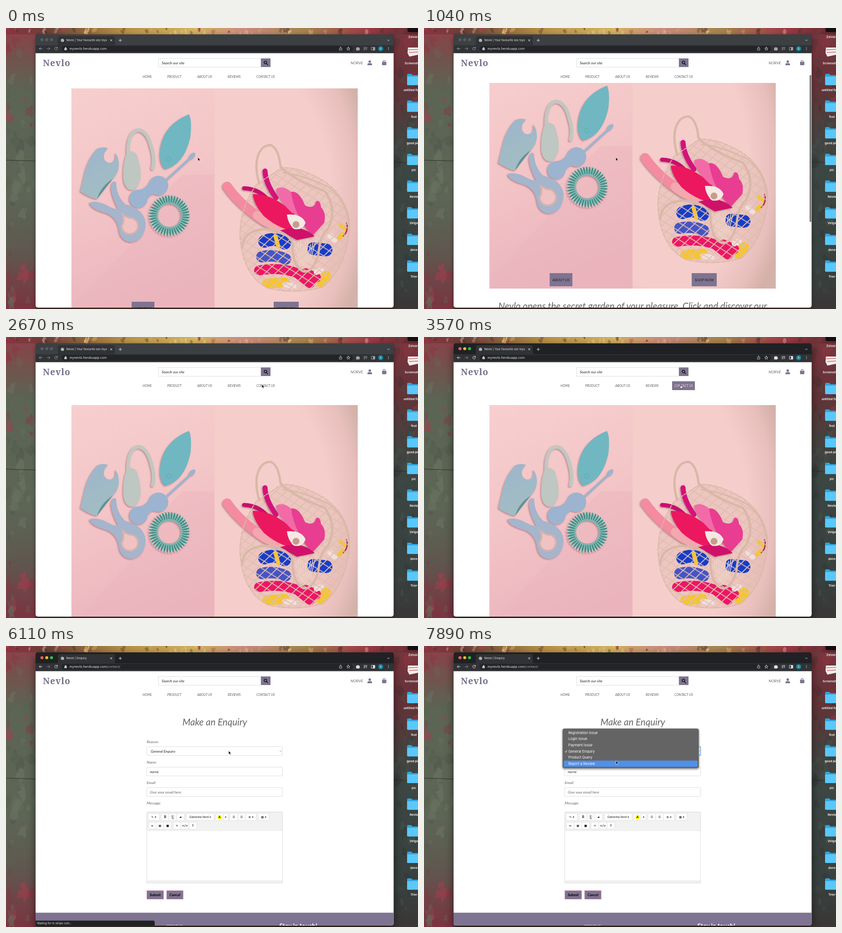
An HTML page for the animation above (8 s loop, 905 by 619 pixels).

```html
<!DOCTYPE html>
<html lang="en">
<head>
<meta charset="utf-8">
<style>
html, body { margin: 0; width: 100%; height: 100%; overflow: hidden; background: #4d5349; }
svg { display: block; width: 905px; height: 619px; }
text { font: italic 8.2px Lato, sans-serif; fill: #666; white-space: pre; }
.ui, .ui text { font: 6.2px Inter, sans-serif; fill: #e8eaed; }
.mid { text-anchor: middle; }
.nav text { font-size: 7.1px; fill: #5e5a66; }
.heading { font-size: 20.5px; }
.dark { fill: #222; }
.button text { fill: #000; font-weight: bold; }
.purple { fill: #7e7491; }
.field { fill: #fff; stroke: #ced4da; stroke-width: .8; }
.line { fill: none; stroke-linecap: round; stroke-linejoin: round; }
.label { font: bold 6.6px Inter, sans-serif; fill: #fff; filter: drop-shadow(0 .5px .6px #000); }
#options text { font: 7.7px Inter, sans-serif; fill: #fff; }
#toys, #bundle { filter: drop-shadow(-1.5px 2.5px 1.5px #a8707caa); }
</style>
</head>
<body>
<svg viewBox="0 0 905 619">
<defs>
  <linearGradient id="topWall">
    <stop offset="0" stop-color="#8b3340"/><stop offset=".1" stop-color="#6b4038"/>
    <stop offset=".28" stop-color="#b58d45"/><stop offset=".45" stop-color="#d2b25c"/>
    <stop offset=".58" stop-color="#c98a7c"/><stop offset=".72" stop-color="#a5834d"/>
    <stop offset=".88" stop-color="#9c3a45"/><stop offset="1" stop-color="#57292c"/>
  </linearGradient>
  <linearGradient id="leftWall" x2="0" y2="1">
    <stop offset="0" stop-color="#8d4049"/><stop offset=".1" stop-color="#74514c"/>
    <stop offset=".22" stop-color="#5c6454"/><stop offset=".6" stop-color="#5d6656"/>
    <stop offset=".8" stop-color="#5f574f"/><stop offset="1" stop-color="#7b3340"/>
  </linearGradient>
  <linearGradient id="rightWall" x2="0" y2="1">
    <stop offset="0" stop-color="#7d353f"/><stop offset=".2" stop-color="#633237"/>
    <stop offset=".38" stop-color="#47423f"/><stop offset=".5" stop-color="#3c4643"/>
    <stop offset=".85" stop-color="#38413f"/><stop offset="1" stop-color="#3a3636"/>
  </linearGradient>
  <linearGradient id="pinkLeft" x2=".25" y2="1">
    <stop offset="0" stop-color="#f7cfce"/><stop offset=".5" stop-color="#f3c5c7"/><stop offset="1" stop-color="#eab4bd"/>
  </linearGradient>
  <radialGradient id="pinkRight" cx=".25" cy=".45" r=".92">
    <stop offset=".6" stop-color="#f5cdca"/><stop offset=".8" stop-color="#e8bfbc"/><stop offset=".92" stop-color="#d4b1a9"/>
  </radialGradient>
  <linearGradient id="cup" x2=".4" y2="1"><stop offset="0" stop-color="#9db5cc"/><stop offset="1" stop-color="#a2bdc3"/></linearGradient>
  <pattern id="mesh" width="16" height="16" patternUnits="userSpaceOnUse" patternTransform="rotate(32) skewX(-14)">
    <path d="M0 8H16M8 0V16" stroke="#dcbfae" stroke-width="2"/>
  </pattern>
  <path id="bagShape" d="M550 345Q512 400 514 460Q520 545 575 573Q640 588 697 570Q750 525 755 435Q752 375 700 338Q645 305 605 308Z"/>
  <clipPath id="bagClip"><use href="#bagShape"/></clipPath>
  <clipPath id="windowClip"><rect x="65" y="14" width="786.5" height="602" rx="5"/></clipPath>
  <clipPath id="pageClip"><rect x="65" y="121" width="786.5" height="495"/></clipPath>
</defs>

<g id="wall">
  <rect width="905" height="619" fill="#48382f"/>
  <rect width="66" height="619" fill="url(#leftWall)"/>
  <rect x="850" width="55" height="619" fill="url(#rightWall)"/>
  <rect width="905" height="14" fill="url(#topWall)"/>
</g>
<path d="M0 291L65 293M851 295L905 297" stroke="#2c2c28" stroke-width="1"/>
<g id="desktop">
  <rect x="882" y="-18" width="30" height="27" rx="4" fill="#170d0f"/>
  <path d="M883 43H905V59L886 63L882 55Z" fill="#f3efee"/><path d="M884 48L905 47M885 54L905 53" stroke="#c66" stroke-width="1.5"/>
</g>

<rect id="shadow" x="65" y="14" width="786.5" height="602" rx="5" fill="#222"/>
<g clip-path="url(#windowClip)">
  <rect x="65" y="55" width="787" height="562" fill="#fff"/>

  <g id="home" clip-path="url(#pageClip)"><g id="scroller">
    <rect x="143.7" y="133" width="316" height="504" fill="url(#pinkLeft)"/>
    <path d="M458 323H388L360 350L300 450L150 610V637H458Z" fill="#eab3bd" opacity=".45"/>
    <rect x="458" y="133" width="314.7" height="504" fill="url(#pinkRight)"/>
    <g id="toys">
      <path d="M163 360L174 313Q182 285 200 266Q215 260 224 265Q212 276 216 289Q223 301 235 295Q243 288 239 275Q248 282 248 303Q247 324 228 338Q210 360 200 377Q183 374 163 360Z" fill="url(#cup)"/>
      <path d="M200 377Q207 350 235 332Q218 353 200 377Z" fill="#5f9497"/>
      <path class="line" d="M269 285C262 212 307 208 319 261Q328 290 322 309" stroke="#c2c7c0" stroke-width="8"/>
      <path d="M266 273Q277 268 287 278Q299 310 295 335Q287 357 276 357Q262 356 258 335Q255 300 266 273Z" fill="#bec7c1"/>
      <path d="M402 190Q340 215 338 278Q338 303 350 311Q392 300 405 240Q409 203 402 190Z" fill="#70b7c2"/>
      <circle cx="357" cy="289" r="5" fill="none" stroke="#5fa5b2"/>
      <g fill="#9cb4cf">
        <path class="line" d="M350 337L408 284" stroke="#9cb4cf" stroke-width="5"/>
        <ellipse cx="409" cy="282" rx="9" ry="5" transform="rotate(-48 409 282)"/>
        <circle cx="291" cy="376" r="20"/><circle cx="335" cy="347" r="21.5"/>
        <path d="M287 357Q308 356 317 336L343 366Q315 360 309 384Z"/>
      </g>
      <path d="M183 385Q200 378 228 394Q240 400 246 398Q233 375 230 352Q233 332 242 340Q242 369 262 388Q303 398 307 430Q305 468 275 472Q250 470 247 440Q241 413 213 406Q187 398 183 385Z" fill="#a5b5cb"/>
      <path d="M256 410Q267 419 278 419A18 18 0 1 1 254 436Q261 425 256 410Z" fill="#f0c2c4" stroke="#d2b3ae" stroke-width="4"/>
      <circle cx="359" cy="413" r="36" fill="none" stroke="#3f877f" stroke-width="15"/>
      <circle cx="359" cy="413" r="37" fill="none" stroke="#82bab4" stroke-width="17" stroke-dasharray="3.2 2.61"/>
      <circle cx="359" cy="413" r="43" fill="none" stroke="#efbfc3" stroke-width="7" stroke-dasharray="2.2 4.55"/>
      <circle cx="359" cy="413" r="27" fill="none" stroke="#86b3ae" stroke-width="4"/>
    </g>

    <use href="#bagShape" fill="#dfb3aa" opacity=".3"/>
    <g class="line" clip-path="url(#bagClip)">
      <path d="M568 470Q590 460 612 474M675 486L703 489" stroke="#173cc9" stroke-width="28"/>
      <path d="M562 504Q590 498 614 509" stroke="#4654c4" stroke-width="25"/>
      <path d="M574 563L612 560M692 560L703 546" stroke="#f6c52f" stroke-width="22"/>
      <path d="M556 534Q602 526 640 540L668 562M658 540L681 550" stroke="#ed1664" stroke-width="22"/>
      <path d="M592 459L598 481M735 434L746 443M739 454L731 463" stroke="#f6c52f" stroke-width="9"/>
      <path d="M712 458L722 467M613 565L632 569M682 538L692 533" stroke="#f1dedc" stroke-width="12"/>
      <path d="M748 430Q753 446 741 459" stroke="#b32c57" stroke-width="3"/>
    </g>
    <use href="#bagShape" fill="url(#mesh)"/>
    <g id="bundle">
      <g class="line">
        <path d="M486 349Q513 389 571 427" stroke="#f48ba1" stroke-width="21"/>
        <path d="M552 413Q577 434 607 440" stroke="#f3a7ae" stroke-width="20"/>
        <path d="M569 315Q570 342 593 374" stroke="#d5127a" stroke-width="11"/>
        <path d="M523 353Q560 354 582 387" stroke="#c90f70" stroke-width="9"/>
      </g>
      <path d="M542 366Q586 364 632 408L654 452Q603 447 566 414Q544 387 542 366Z" fill="#ec185f"/>
      <path d="M594 354Q614 344 635 371L658 415L628 407Q596 377 594 354Z" fill="#f36aa8"/>
      <path d="M626 361Q643 357 657 391Q678 400 681 382Q690 377 692 395Q704 407 699 429L673 458Q634 415 626 361Z" fill="#e93d91"/>
      <path d="M602 446Q650 431 678 459L639 467Z" fill="#cf116a"/>
      <path d="M617 411Q650 409 658 429Q650 449 631 441Q619 430 617 411Z" fill="#f6e9e5"/>
      <circle cx="637" cy="433" r="9" fill="#c59c8d" stroke="#f6e4df" stroke-width="3"/>
    </g>
    <g class="line" stroke="#d8b8a8">
      <path d="M556 342C540 285 560 256 582 258Q599 266 603 305Q626 331 701 360Q729 400 707 443Q690 455 686 500Q673 541 653 536Q629 526 629 472Q610 440 560 444Q520 450 519 483" stroke-width="5"/>
      <path d="M609 319Q650 323 708 350Q748 379 753 431" stroke-width="3"/>
      <path id="fringe" stroke="#ecd4c8" stroke-width="1.7"/>
      <use href="#bagShape" fill="none" stroke-width="2" stroke-dasharray="9 3"/>
    </g>

    <g class="mid">
      <rect class="purple" x="276" y="603" width="50" height="29"/><text class="dark" x="301" y="620.5">ABOUT US</text>
      <rect class="purple" x="588" y="603" width="55" height="29"/><text class="dark" x="615.5" y="620.5">SHOP NOW</text>
      <text class="heading" x="458.3" y="682.5">Nevlo opens the secret garden of your pleasure. Click and discover our</text>
      <text class="heading" x="458.3" y="708">orgasmic selection of stimulating vibrators</text>
      <text x="458.3" y="738.5">We have a wide range of <tspan fill="#000" font-weight="bold">high quality sex toys</tspan> which will surrender you to endlessly orgasms.</text>
    </g>
  </g></g>

  <g id="contact">
    <text class="heading mid" x="458.5" y="174.5">Make an Enquiry</text>
    <text x="309" y="214">Reason:</text><text x="309" y="259">Name:</text>
    <text x="309" y="304">Email:</text><text x="309" y="349">Message:</text>
    <rect id="select" class="field" x="309" y="221.7" width="298.5" height="19.3" rx="2"/>
    <text class="dark" x="318" y="234.7">General Enquiry</text>
    <path class="line" d="M601.5 230.7L603.3 232.4L605.1 230.7" stroke="#888"/>
    <rect class="field" x="309" y="266.8" width="298.5" height="19.3" rx="2"/><text class="dark" x="316" y="279.7">norve</text>
    <rect class="field" x="309" y="312" width="298.5" height="19.3" rx="2"/><text x="316" y="324.8">Give your email here</text>
    <rect class="field" x="309" y="365.5" width="298.5" height="156.5" rx="1"/>
    <path d="M309.4 366H607V407H309.4ZM309.4 517H607V521.6H309.4Z" fill="#f2f2f2" stroke="#ddd" stroke-width=".6"/>
    <g id="tools"></g>
    <g class="mid button">
      <rect class="purple" x="309.5" y="539" width="36.5" height="18.5" stroke="#c77b9c"/><text x="327.7" y="551.2">Submit</text>
      <rect class="purple" x="353" y="539" width="36" height="18.5" stroke="#c77b9c"/><text x="371" y="551.2">Cancel</text>
    </g>
    <rect class="purple" x="65" y="587.5" width="787" height="29"/>
    <text x="351" y="620" style="fill:#fff">ABOUT US</text>
    <text x="600" y="622" style="fill:#fff;font-size:14.5px;font-weight:bold">Stay in touch!</text>
  </g>

  <rect x="65" y="55" width="782" height="66" fill="#fff"/>
  <text x="81" y="84" style="font:600 19px 'Noto Serif',serif;letter-spacing:1px;fill:#756d8a">Nevlo</text>
  <rect class="field" x="335" y="67" width="225" height="19.3"/><text class="dark" x="342" y="80">Search our site</text>
  <rect class="purple" x="560" y="67" width="21" height="19"/>
  <path class="line" d="M572.2 78.5L575 81.3M572.8 75.8a2.9 2.9 0 1 1-5.8 0a2.9 2.9 0 1 1 5.8 0" stroke="#111" stroke-width="1.5"/>
  <text x="757" y="79.7" style="font-size:8.5px">NORVE</text>
  <path class="purple" d="M796.3 74a2.7 2.7 0 1 1 5.4 0a2.7 2.7 0 1 1-5.4 0M794 82V80Q794 77.5 797 77.5H801Q804 77.5 804 80V82ZM826 74.5H835.5V80.5Q835.5 82 834 82H827.5Q826 82 826 80.5Z"/>
  <path class="line" d="M828.5 76V73.5a2.2 2.2 0 0 1 4.4 0V76" stroke="#7e7491" stroke-width="1.2"/>
  <g class="nav">
    <text x="300" y="110">HOME</text><text x="354" y="110">PRODUCT</text><text x="420" y="110">ABOUT US</text><text x="487" y="110">REVIEWS</text>
    <rect id="hover" class="purple" x="545" y="97.5" width="50" height="19.5"/><text id="contactLink" x="550" y="110">CONTACT US</text>
  </g>
  <rect id="scrollbar" x="847" width="3.6" height="324" rx="1.8" fill="#777"/>

  <rect id="strip" x="65" y="14" width="787" height="25"/>
  <path d="M111 38Q114 38 114 35V22Q114 18 118 18H235Q239 18 239 22V35Q239 38 242 38H852V55.5H65V38Z" fill="#303235"/>
  <rect x="122" y="39.5" width="640" height="13" rx="6.5" fill="#222427"/>
  <g id="lights"><circle cx="79" cy="25.7" r="3.3"/><circle cx="89.5" cy="25.7" r="3.3"/><circle cx="100" cy="25.7" r="3.3"/></g>
  <g class="ui">
    <g id="globe"><circle cx="124" cy="27.2" r="3.4" fill="#d0d3d6"/><path class="line" d="M121.5 26L124 27.5L123.5 29.5M124.5 24.5L126.5 26.5" stroke="#55595d"/></g>
    <text id="title" x="132.5" y="29.4"></text>
    <text x="139.5" y="48.1" style="font-size:7px">mynevlo.herokuapp.com<tspan id="path" fill="#aaaeb3">/contact/</tspan></text>
  </g>
  <g class="line" stroke="#dfe1e4">
    <path d="M229.2 25.2L233 29M233 25.2L229.2 29M248 27.2H254M251 24.2V30.2M838 26.2L840 28.2L842 26.2"/>
    <path d="M90 45.5H96.5M93.7 42.7L96.5 45.5L93.7 48.3" stroke="#85898d"/>
    <g id="active">
      <path d="M79.5 45.5H73M75.8 42.7L73 45.5L75.8 48.3"/>
      <path id="reload" d="M112.6 43.6A3.1 3.1 0 1 0 113 46.5M113 42.3V44.5H110.8"/>
      <path id="stop" d="M107.7 43L112.7 48M112.7 43L107.7 48"/>
      <path d="M786 43H793M786 45.5H790M786 48H789M792 44V48M803 42.5H810V48.8H803Z"/>
      <path d="M807 42.5H810V48.8H807ZM770 43.5H772a1 1 0 0 1 2 0H776V45.5a1 1 0 0 1 0 2V49H770Z" fill="#dfe1e4"/>
    </g>
    <path d="M733 44.5H732.3V48.8H737.7V44.5H737M735 46.5V41.7L733.6 43M735 41.7L736.4 43" stroke-width=".8"/>
    <path d="M752 41.8L753 44.4L755.7 44.5L753.6 46.2L754.4 48.9L752 47.4L749.6 48.9L750.4 46.2L748.3 44.5L751 44.4Z" stroke-width=".8"/>
    <path d="M128.8 45.3H133.2V48.3H128.8ZM129.7 45V44a1.3 1.3 0 0 1 2.6 0V45" stroke-width=".8" fill="#bbb"/>
    <path d="M840 43V43M840 45.5V45.5M840 48V48" stroke-width="1.5"/>
  </g>
  <circle cx="823" cy="45.5" r="5.6" fill="#158498"/><text class="ui mid" x="823" y="47.8">B</text>
</g>

<g id="status" class="ui">
  <path d="M65 605H323.5Q326.5 605 326.5 608V617H65Z" fill="#202124" stroke="#3c4043" stroke-width=".6"/>
  <text x="68" y="613.2">Waiting for m.stripe.com…</text>
</g>
<g id="options">
  <rect x="304.5" y="182" width="299" height="87" rx="4" fill="#646464" stroke="#858585" stroke-width=".7" style="filter:drop-shadow(0 2px 2px #0007)"/>
  <rect id="option" x="307" width="294" height="13.6" rx="2" fill="#4f90ec"/>
  <path class="line" d="M310 232.5L311.5 234.3L314 229.8" stroke="#fff"/>
</g>
<g id="cursor">
  <path id="arrow" d="M0 0V7.6L1.8 6L3 8.8L4.5 8.1L3.3 5.4H5.7Z" fill="#000" stroke="#fff" stroke-width=".7"/>
  <path id="hand" d="M1 1Q1.8 -.3 2.5 1V3.5L6 4.3Q6.7 5 5.8 8.5H2.3L-.3 5.5Q-.2 4.5 1 5Z" fill="#fff" stroke="#111" stroke-width=".7"/>
</g>
</svg>

<script>
const $ = id => document.getElementById(id);
const show = (id, on) => $(id).style.display = on ? '' : 'none';
const add = (parent, markup) => $(parent).insertAdjacentHTML('beforeend', markup);
let seed = 11;
const random = () => (seed = seed * 16807 % 2147483647) / 2147483647;
const pick = list => list[Math.floor(random() * list.length)];

// Flaking paint on both visible sides and along the top edge.
function flake(x, y, size, color) {
  const points = Array.from({ length: 9 }, (_, i) => {
    const r = size * (0.35 + random()), a = i * Math.PI / 4.5;
    return [x + r * Math.cos(a), y + 1.6 * r * Math.sin(a)].map(Math.round);
  });
  add('wall', `<polygon points="${points.join(' ')}" fill="${color}" opacity="${0.3 + random() * 0.4}"/>`);
}
for (let i = 0; i < 60; i++) {
  const leftY = random() * 619, rightY = random() * 619;
  const red = leftY < 90 || leftY > 490 || (leftY > 150 && leftY < 225);
  flake(random() * 65, leftY, 3 + random() * 9, pick(red ? ['#a33d4c', '#8c3340', '#646c5b'] : ['#515a4d', '#6b7362', '#59624f']));
  flake(852 + random() * 53, rightY, 3 + random() * 8, pick(rightY < 190 ? ['#8a3742', '#4f3033', '#54433f'] : ['#39423e', '#465049', '#343837']));
  flake(random() * 850, random() * 12, 2 + random() * 4, pick(['#ecd27a', '#4d332c', '#a9434f', '#d5a294']));
}

['Zelvora', 'Screenshots', 'untitled folder', 'feat', 'good pics', 'pic', 'Nevlo', 'Velgo', 'done', 'Trier'].forEach((name, i) => {
  const y = 21.5 + 58.7 * i;
  if (i > 1) add('desktop', `<path d="M881 ${y - 35}Q881 ${y - 38} 883 ${y - 38}H890L893 ${y - 35}H912V${y - 13}H883Q881 ${y - 13} 881 ${y - 15}Z" fill="#2fa5df"/>
    <path d="M881 ${y - 32}H912V${y - 13}H883Q881 ${y - 13} 881 ${y - 15}Z" fill="#5ac8fa"/>`);
  add('desktop', `<text class="label mid" x="896" y="${y}">${name}</text>`);
});

$('fringe').setAttribute('d', Array.from({ length: 9 }, (_, i) =>
  `M${636 + i * 5.5} ${477 - i % 3 * 5}Q${640 + i * 4} 500 ${646 + i * 3} ${526 - Math.abs(i - 3) * 3}`).join(''));

// Editor buttons: x, y, width and label.
[[312, 369, 25, '✎ ▾'], [341, 369, 17, 'B'], [358, 369, 17, 'U'], [375, 369, 17, '▰'], [396, 369, 61, 'Galvorina Nord ▾'],
 [461, 369, 16, 'A'], [477, 369, 11, '▾'], [492, 369, 17, '☰'], [509, 369, 17, '☰'], [526, 369, 24, '≡ ▾'], [554, 369, 24, '▦ ▾'],
 [313, 388, 16.5, '∞'], [329.5, 388, 17, '▣'], [346.5, 388, 17, '■'], [367, 388, 17, '✕'], [384, 388, 18, '</>'], [402, 388, 17, '?']
].forEach(([x, y, w, label]) => {
  const face = 'BU'.includes(label) ? "bold 7.5px 'Liberation Serif',serif" : label.length > 5 ? "6.3px 'Liberation Sans',sans-serif" : "bold 6.5px 'DejaVu Sans',sans-serif";
  add('tools', `<rect x="${x}" y="${y}" width="${w}" height="15.5" rx="1" fill="#fff" stroke="#d5d5d5" stroke-width=".7"/>
    ${label === 'A' ? `<rect x="${x + 4}" y="${y + 3.5}" width="8" height="8.5" fill="#ff0"/>` : ''}
    <text class="mid" x="${x + w / 2}" y="${y + 10.3}" style="font:${face};fill:#222${label === 'U' ? ';text-decoration:underline' : ''}">${label.replace('<', '&lt;')}</text>`);
});

['Registration Issue', 'Login Issue', 'Payment Issue', 'General Enquiry', 'Product Query', 'Report a Review']
  .forEach((name, i) => add('options', `<text x="317" y="${193.8 + i * 13.65}">${name}</text>`));

const scrollKeys = [[0, 17], [439, 17], [440, 40], [590, 108], [740, 145], [890, 135], [1040, 80], [1190, 22], [1340, -4.5], [1490, -1], [1640, 0]];
const cursorKeys = [[0, 421.3, 285], [1640, 421.3, 285], [2370, 561, 104], [2520, 561, 104], [2670, 562, 104.5], [5660, 562, 104.5],
  [6110, 489, 231], [6560, 440, 231], [6990, 440, 231], [7290, 432, 219], [7740, 421.5, 252], [7890, 421.5, 253]];

function at(keys, t) {
  const next = keys.findIndex(k => k[0] > t);
  if (next < 0) return keys.at(-1).slice(1);
  const a = keys[next - 1], b = keys[next], p = (t - a[0]) / (b[0] - a[0]);
  return a.slice(1).map((v, i) => v + (b[i + 1] - v) * p);
}

// The screen refreshes every 150 ms, restarting at a few moments.
function snap(t) {
  const base = [6840, 5660, 2370, 440, 0].find(b => t >= b);
  return base ? base + Math.floor((t - base) / 150) * 150 : 0;
}

function draw(now) {
  const t = snap(now % 8000);
  const [scroll] = at(scrollKeys, t), [x, y] = at(cursorKeys, t);
  const focused = t >= 3270, contact = t >= 5370, hover = focused && !contact;
  const loading = t >= 4620 && t < 5810, open = t >= 6990;

  show('home', !contact);
  show('contact', contact);
  $('scroller').setAttribute('transform', `translate(0 ${17 - scroll})`);
  show('scrollbar', t >= 440 && t < 2220);
  $('scrollbar').setAttribute('y', 57 + 0.58 * Math.max(0, scroll));

  $('strip').setAttribute('fill', focused ? '#202124' : '#3c4043');
  $('shadow').style.filter = focused ? 'drop-shadow(0 6px 9px #0008)' : 'drop-shadow(0 2px 4px #0006)';
  [...$('lights').children].forEach((c, i) => c.setAttribute('fill', focused ? ['#ff5f57', '#febc2e', '#28c840'][i] : '#585c5f'));
  $('active').style.opacity = focused ? 1 : 0.65;
  $('globe').style.opacity = loading ? 0.2 : 1;
  show('reload', !loading);
  show('stop', loading);
  show('path', contact);
  $('title').textContent = contact ? 'Nevlo | Enquiry' : 'Nevlo | Your favourite sex toys';
  show('hover', hover);
  $('contactLink').style.fill = hover ? '#f6d5dc' : '';
  show('status', t >= 4920 && t < 6410);

  $('select').style.stroke = t >= 6840 ? '#80b5f2' : '';
  $('select').style.strokeWidth = t >= 6840 ? 1.8 : '';
  show('options', open);
  const row = Math.max(0, Math.min(5, Math.floor((y - 184.2) / 13.65)));
  $('option').setAttribute('y', 184.2 + row * 13.65);
  $('cursor').setAttribute('transform', `translate(${x} ${y})`);
  show('arrow', !hover);
  show('hand', hover);
  requestAnimationFrame(draw);
}
requestAnimationFrame(draw);
</script>
</body>
</html>
```
